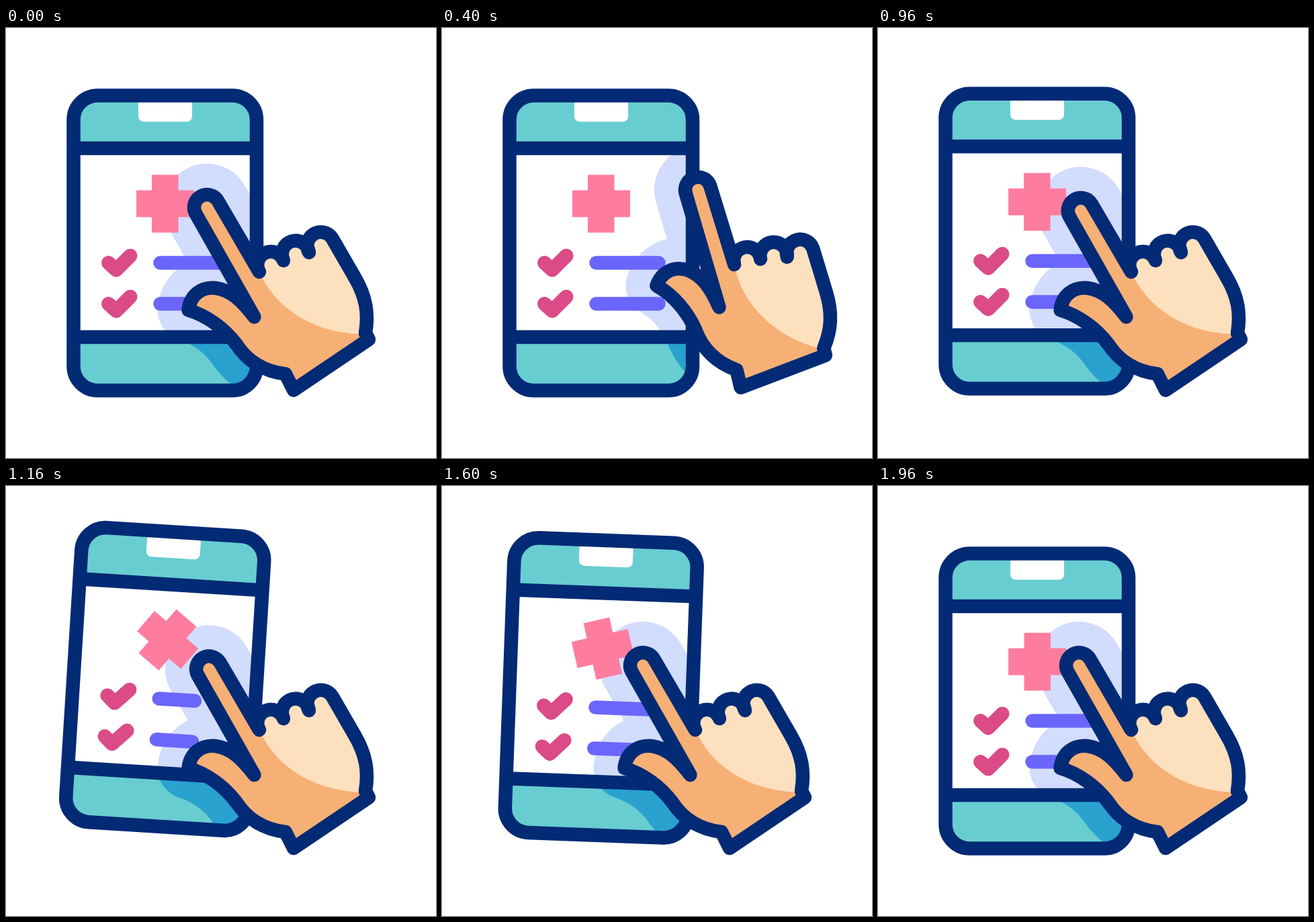
Animation of 640 by 640 pixels, one loop 2 s. Source, as an HTML page with a canvas:

```html
<!DOCTYPE html>
<html lang="en">
<head>
<meta charset="utf-8">
<title>Tapping a health app</title>
<style>
html, body { margin: 0; width: 100%; height: 100%; overflow: hidden; background: #fff; }
canvas { display: block; width: 640px; height: 640px; }
</style>
</head>
<body>
<canvas width="640" height="640"></canvas>
<script>
const ctx = document.querySelector('canvas').getContext('2d');
const LOOP = 2000, STEP = 40;
const NAVY = '#032a75', TEAL = '#68cdd1', BLUE = '#29a2cf', LILAC = '#d2dcfd';

const ramp = (t, start, end) => Math.min(1, Math.max(0, (t - start) / (end - start)));
const smooth = u => u * u * (3 - 2 * u);
const easeOut = u => 1 - (1 - u) ** 2;

// Rises from 0 to 1 between a and b, falls back between c and d
const pulse = (t, a, b, c, d) => smooth(ramp(t, a, b)) - smooth(ramp(t, c, d));

const swing = t => 13.2 * pulse(t, 0, 410, 560, 835);
const press = t => 11 * pulse(t, 860, 1060, 1060, 1280);
const lift = t => -38 * pulse(t, 905, 1240, 1380, 1830);
const tilt = t => 4 * pulse(t, 1040, 1190, 1190, 1380)
  - 1.2 * pulse(t, 1190, 1380, 1380, 1600)
  + 2.1 * pulse(t, 1380, 1600, 1600, 1820);
const spin = t => 180 * smooth(easeOut(ramp(t, 994, 2040)));
const lineLength = t => 93 - 57 * pulse(t, 920, 1300, 1300, 1640);

function stroke(path, color, width) {
  ctx.strokeStyle = color;
  ctx.lineWidth = width;
  ctx.stroke(path);
}

function fill(path, color) {
  ctx.fillStyle = color;
  ctx.fill(path);
}

function rect(x, y, w, h, radius = 0) {
  const path = new Path2D();
  path.roundRect(x, y, w, h, radius);
  return path;
}

function rotateAbout(x, y, degrees) {
  ctx.translate(x, y);
  ctx.rotate(degrees * Math.PI / 180);
  ctx.translate(-x, -y);
}

// The press pulls the fingertip back along the finger
function handPath(pull) {
  const dx = pull * .5, dy = pull * .866;
  return new Path2D(`M369.5 430L${282.5 + dx} ${276.5 + dy}
    A19 19 0 0 1 ${315.5 + dx} ${257.5 + dy}L377 363
    A20 20 0 1 1 413 346A20.2 20.2 0 1 1 451 334A20.2 20.2 0 0 1 485.5 313
    L519 371C536 400 540 425 535 454L540 463.5L428 539L416 515
    C384 511 360 497 343 471C325 447 299 428 271.5 420
    C274 398 290 385 312 387C335 390 352 407 369.5 430Z`);
}

const phone = rect(100.5, 100.5, 272.5, 439, 36);
const screen = rect(110, 179, 254, 281);
const base = rect(110, 460, 254, 80, [0, 0, 36, 36]);
const notch = rect(197, 105, 80, 34.5, 8);
const dividers = new Path2D('M102 179H371M102 460H371');
const cross = new Path2D('M217 218.5h39.5v23h23.5v40h-23.5v23h-39.5v-23h-23v-40h23Z');
const palm = new Path2D('M377 363C400 415 455 455 535 456H570V280H377Z');

function drawShadow(area, color, hand, t) {
  ctx.save();
  ctx.clip(area);
  // Back to stage space, so the shadow follows the hand
  ctx.resetTransform();
  rotateAbout(453.4, 609, swing(t));
  fill(hand, color);
  stroke(hand, color, 92);
  ctx.restore();
}

function drawPhone(hand, t) {
  ctx.save();
  ctx.translate(0, lift(t));
  rotateAbout(236.8, 320, tilt(t));
  fill(phone, TEAL);
  fill(screen, '#fff');
  fill(notch, '#fff');
  drawShadow(screen, LILAC, hand, t);
  drawShadow(base, BLUE, hand, t);

  for (const y of [349.5, 410.5]) {
    stroke(new Path2D(`M152.5 ${y}l11.5 10.5l21 -21`), '#db4b87', 21);
    stroke(new Path2D(`M229.5 ${y}h${lineLength(t)}`), '#6a66fb', 20.5);
  }
  stroke(dividers, NAVY, 20.5);
  stroke(phone, NAVY, 20.5);

  rotateAbout(237, 261.5, spin(t));
  fill(cross, '#fe7d9f');
  ctx.restore();
}

function drawHand(hand, t) {
  ctx.save();
  rotateAbout(453.4, 609, swing(t));
  fill(hand, '#f6b075');
  ctx.save();
  ctx.clip(hand);
  fill(palm, '#fde0be');
  ctx.restore();
  stroke(hand, NAVY, 20.5);
  ctx.restore();
}

function draw() {
  const now = performance.now() % LOOP;
  const t = now - now % STEP;
  const hand = handPath(press(t));
  ctx.clearRect(0, 0, 640, 640);
  ctx.lineCap = ctx.lineJoin = 'round';
  drawPhone(hand, t);
  drawHand(hand, t);
  requestAnimationFrame(draw);
}
draw();
</script>
</body>
</html>
```
